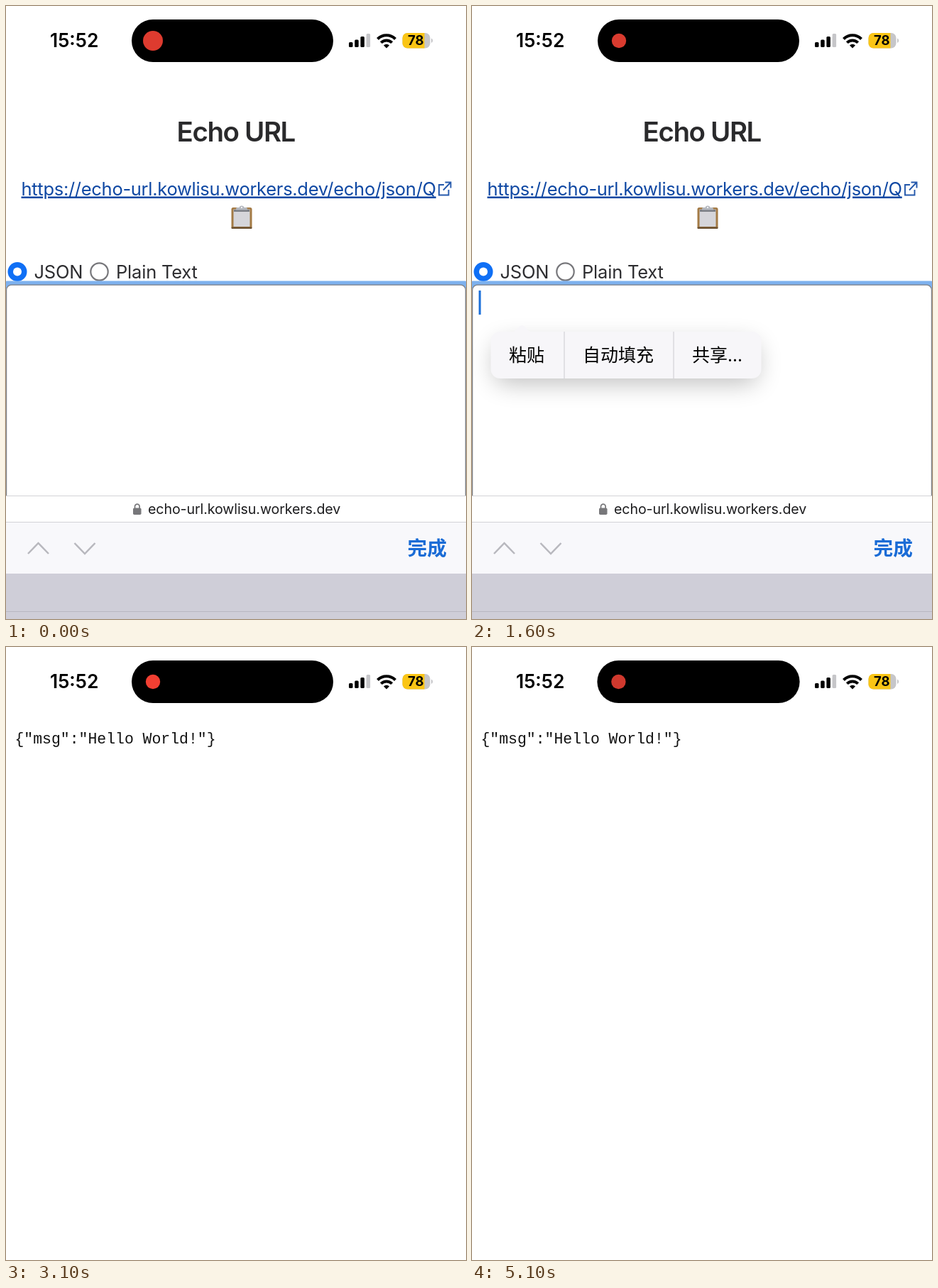
These frames come from a looping animation (648x864 px, 5.2 s). An HTML page:

```html
<!DOCTYPE html>
<html lang="en">
<head>
<meta charset="utf-8">
<title>Echo URL</title>
<style>
html, body { margin: 0; width: 100%; height: 100%; overflow: hidden; background: #fff; }
svg { display: block; width: 648px; height: 864px; }
text { font-family: Inter, sans-serif; font-size: 25.5px; font-optical-sizing: none; white-space: pre; }
.link { fill: #0f48a3; letter-spacing: -.29px; text-decoration: underline; text-decoration-thickness: 1.7px; }
.label { fill: #2d2d30; letter-spacing: -.2px; }
.code { fill: #111; letter-spacing: -.05px; }
.cjk { font-family: "Noto Sans CJK SC", "Noto Sans CJK", sans-serif; }
.mono { font: 21.44px "Liberation Mono", monospace; }
.icon { fill: none; stroke: #2458ab; stroke-width: 1.9; }
.hair { stroke: #d2d2d6; stroke-width: 1.2; }
</style>
</head>
<body>
<svg viewBox="0 0 648 864" xmlns="http://www.w3.org/2000/svg">
  <defs>
    <g id="clip">
      <rect x="317.5" y="284" width="29" height="30" rx="2.5" fill="#a37a45"/>
      <rect x="317.5" y="311.5" width="29" height="2.5" rx="1" fill="#6d5233"/>
      <rect x="320.5" y="286.5" width="23" height="24.5" fill="#d5d5da"/>
      <path d="M321 287h22v3h-22z" fill="#7c7f86"/>
      <path d="M324 287.5v-2q0-1.5 2-1.5h2.5q.5-2.5 3.5-2.5t3.5 2.5h2.5q2 0 2 1.5v2z" fill="#b4b8bf"/>
      <circle cx="332" cy="284" r="1.1" fill="#fff"/>
    </g>
    <g id="out" class="icon">
      <path d="M617 252H610V266.5H623.5V259"/>
      <path d="M616 259.5L626 249M618.5 248.5H626.5V256.5"/>
    </g>
    <clipPath id="cell"><rect x="558.5" y="38" width="39" height="21.5" rx="7"/></clipPath>
    <filter id="soft" x="-30%" y="-100%" width="160%" height="320%">
      <feGaussianBlur stdDeviation="17"/>
    </filter>
  </defs>

  <rect width="648" height="864" fill="#fff"/>

  <g id="page">
    <text x="240.5" y="191" fill="#2a2a2c" style="font-size:38.5px;font-weight:600;letter-spacing:-1.4px">Echo URL</text>
    <path id="tap" d="M0 237H648V278H579V316H8V278H0Z" fill="#cdcdd0"/>
    <g id="short">
      <text class="link" x="21.5" y="266.5">https://echo-url.kowlisu.workers.dev/echo/json/Q</text>
      <use href="#out"/>
      <use href="#clip"/>
    </g>
    <g id="long">
      <text class="link" x="2" y="266.5">https://echo-url.kowlisu.workers.dev/echo/json/N4Igtg</text>
      <text class="link" x="12" y="306" style="letter-spacing:-.17px">zg5iBcIAkCmAbFB7ABAdXQJxQBMBCEAXyA</text>
      <use href="#out" x="-52" y="39.5"/>
      <use href="#clip" x="285"/>
    </g>

    <circle cx="16" cy="374.5" r="13.5" fill="#0f6ff5"/>
    <circle cx="16" cy="374.5" r="6" fill="#fff"/>
    <text class="label" x="39.5" y="384">JSON</text>
    <circle cx="131.5" cy="374.5" r="12.2" fill="#fff" stroke="#77777b" stroke-width="2.2"/>
    <text class="label" x="155" y="384">Plain Text</text>

    <rect x="-4" y="387.5" width="656" height="320" rx="6" fill="#7db1ee"/>
    <rect x=".6" y="393.2" width="646.8" height="330" rx="7" fill="#fff" stroke="#7c8087" stroke-width="1.2"/>
    <g id="json">
      <text class="code" x="9" y="427">{</text>
      <text class="code" x="24" y="458.5">"msg": "Hello World!"</text>
      <text class="code" x="9" y="490">}</text>
    </g>
    <rect id="caret" width="3" fill="#1a6fd9"/>

    <g id="menu">
      <rect x="32" y="474" width="370" height="58" rx="14" fill="#000" opacity=".25" filter="url(#soft)"/>
      <path d="M55 460q6-1 10-6.5q5.5-7 11 0q4 5.500 10 6.500z" fill="#f7f6f9"/>
      <rect x="26.5" y="459" width="381" height="66" rx="13" fill="#f7f6f9"/>
      <path class="hair" d="M130 459V525M284 459V525"/>
      <text class="cjk" x="52" y="500.5" style="font-size:25px">粘贴</text>
      <text class="cjk" x="156" y="500.5" style="font-size:25px">自动填充</text>
      <text class="cjk" x="310" y="500.5" style="font-size:25px">共享...</text>
    </g>

    <rect y="690" width="648" height="38" fill="#fff"/>
    <path class="hair" d="M0 690.5H648"/>
    <rect x="179" y="707.5" width="11.5" height="9.5" rx="1.8" fill="#77777a"/>
    <path d="M181.5 708v-2.5a3.3 3.3 0 0 1 6.6 0v2.5" fill="none" stroke="#77777a" stroke-width="1.7"/>
    <text x="200" y="716" fill="#1c1c1e" style="font-size:19.6px;letter-spacing:-.09px">echo-url.kowlisu.workers.dev</text>
    <rect y="728" width="648" height="72" fill="#f8f8fb"/>
    <path class="hair" d="M0 727.5H648"/>
    <path d="M31 772L45.5 757L60 772M96.5 757L111 772L125.5 757" fill="none" stroke="#b8b8be" stroke-width="2.5"/>
    <text class="cjk" x="565.5" y="774" fill="#1a6cd6" style="font-size:27.7px;font-weight:600">完成</text>
    <rect y="800" width="648" height="64" fill="#cfced8"/>
    <path d="M0 853.5H648" stroke="#b9b8c1" stroke-width="1.2"/>
  </g>

  <text id="reply" class="mono" x="12.5" y="136" fill="#111">{"msg":"Hello World!"}</text>

  <text x="62" y="58" style="font-size:26.4px;font-weight:600">15:52</text>
  <rect id="island" y="19" height="60" rx="30"/>
  <circle id="dot" cy="49"/>
  <g id="bars"></g>
  <g fill="none" stroke="#000" stroke-width="4">
    <path d="M523.5 46.5a17.5 17.5 0 0 1 25 0"/>
    <path d="M528.3 51.7a10.8 10.8 0 0 1 15.4 0"/>
  </g>
  <path d="M536 59.5l-4-4.1a5.7 5.7 0 0 1 8 0z"/>
  <g clip-path="url(#cell)">
    <rect x="558" y="38" width="40" height="22" fill="#c6c6c9"/>
    <rect x="558" y="38" width="31.5" height="22" fill="#fac515"/>
  </g>
  <path d="M599 45.5q2.2 1 2.2 3.2t-2.2 3.2z" fill="#c6c6c9"/>
  <text x="577.3" y="55.3" text-anchor="middle" style="font-size:18.5px;font-weight:700">78</text>
</svg>
<script>
const LOOP = 5200;
const el = id => document.getElementById(id);
const set = (id, attrs) => { for (const k in attrs) el(id).setAttribute(k, attrs[k]); };
const show = (id, on) => set(id, { visibility: on ? "visible" : "hidden" });
const ramp = (t, a, b) => Math.min(1, Math.max(0, (t - a) / (b - a)));
const mix = (a, b, k) => a + (b - a) * k;

// recording light: [time, brightness]
const glow = [[0, .3], [600, .1], [1200, 1], [1650, .1], [2300, 1], [2850, .5],
  [3400, 1], [3700, .5], [4000, .1], [4500, 1], [5100, 0], [LOOP, 0]];

function brightness(t) {
  const i = glow.findIndex(p => p[0] > t);
  const [a, b] = [glow[i - 1], glow[i]];
  return mix(a[1], b[1], ramp(t, a[0], b[0]));
}

el("bars").innerHTML = [7, 10.5, 15, 19].map((h, i) =>
  `<rect x="${483 + i * 8.2}" y="${58 - h}" width="5.5" height="${h}" rx="1.5" fill="${i < 3 ? "#000" : "#c6c6c9"}"/>`).join("");

function draw(t) {
  const pasted = t >= 2100, open = t < 3000;
  set("page", { display: open ? "inline" : "none" });
  show("short", !pasted);
  show("long", pasted);
  show("json", pasted);
  show("tap", t >= 2800);
  show("reply", t >= 3100);
  show("caret", t >= 1400);
  set("caret", pasted ? { x: 18, y: 466, height: 32 } : { x: 9.5, y: 401, height: 34 });
  set("menu", { opacity: ramp(t, 1400, 1600) * (1 - ramp(t, 2000, 2150)) });

  const k = brightness(t), press = ramp(t, 4850, 5100);
  set("island", { x: 177 - press * .6, width: 284 + press * 1.2 });
  set("dot", {
    cx: 207 - press * .6,
    r: mix(14, 10.2, ramp(t, 0, 500)),
    fill: `rgb(${mix(208, 255, k)},${mix(57, 65, k)},${mix(46, 51, k)})`
  });
}

function tick() {
  draw(performance.now() % LOOP);
  requestAnimationFrame(tick);
}
tick();
</script>
</body>
</html>
```
